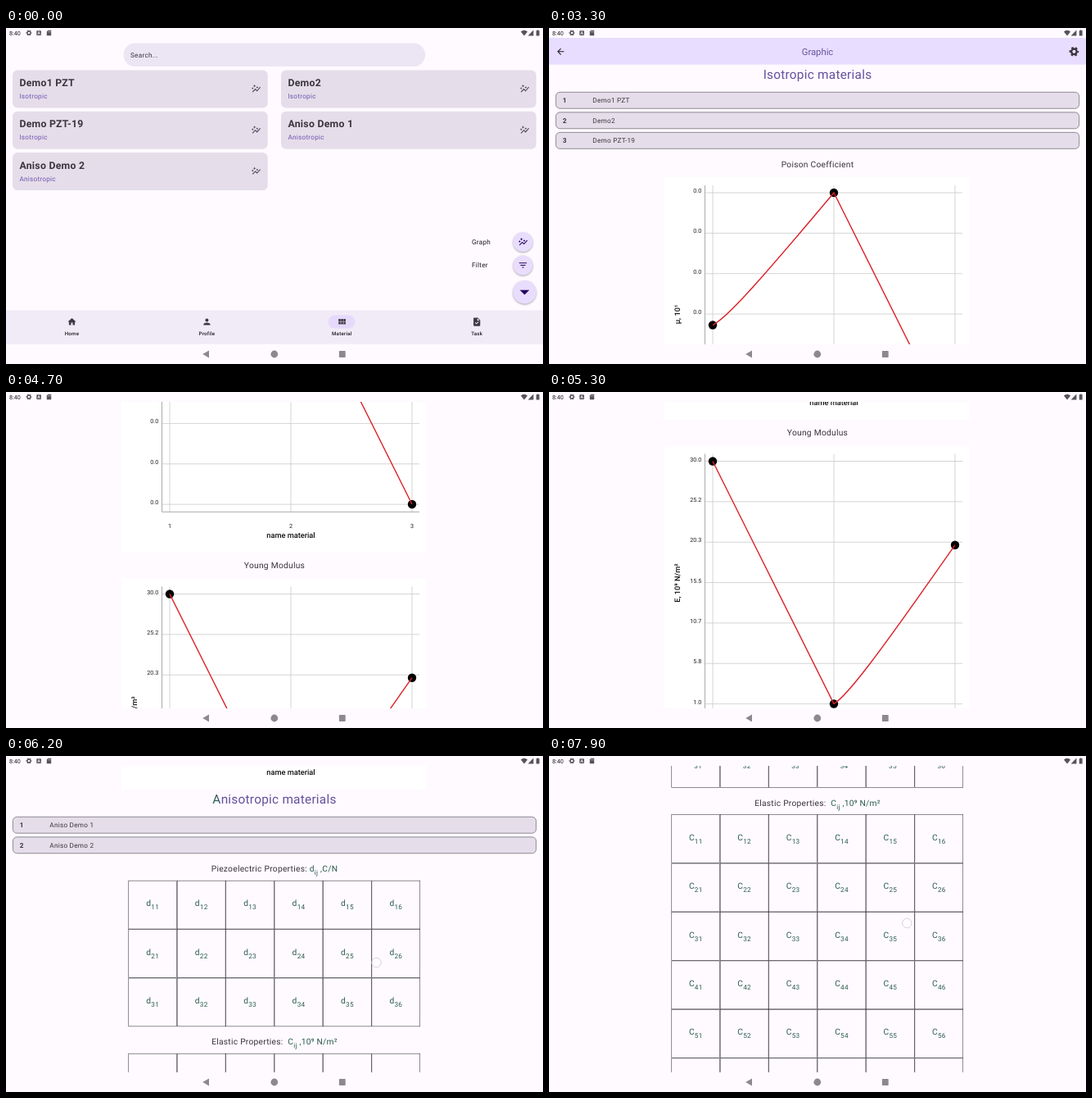
An HTML page for the animation above (8 s loop, 656 by 410 pixels).

```html
<!DOCTYPE html>
<html lang="en">
<head>
<meta charset="utf-8">
<title>Materials</title>
<style>
  html, body { margin: 0; width: 100%; height: 100%; overflow: hidden; background: #fefaff; }
  svg { display: block; width: 656px; height: 410px; }
  text { font: 8.2px Roboto, sans-serif; letter-spacing: .256px; fill: #1d1b20; text-rendering: geometricPrecision; white-space: pre; }
  .mid { text-anchor: middle; }
  .card { font-size: 12.3px; font-weight: 700; fill: #3a363f; }
  .kind { fill: #6f55ae; }
  .nav { font-size: 6.15px; font-weight: 500; }
  .bar { font-size: 11.275px; letter-spacing: 0; fill: #65539e; }
  .head { font-size: 15.375px; fill: #62519c; }
  .sub { font-size: 10.25px; fill: #37333b; }
  .row { fill: #3a363f; }
  .num { font-weight: 700; }
  .tick { font-size: 7.2px; letter-spacing: 0; }
  .axis { font-size: 9.225px; font-weight: 500; letter-spacing: 0; fill: #111; }
  .sym { font-size: 10.25px; fill: #2b5c4b; }
  .low { font-size: 8.2px; }
  .fab { fill: #e8ddfd; filter: drop-shadow(.6px 1.2px 1.2px #0005); }
</style>
</head>
<body>
<svg id="stage" viewBox="0 0 656 410">
  <defs>
    <clipPath id="view"><rect y="12" width="656" height="374"/></clipPath>
  </defs>
  <g id="list"></g>
  <g clip-path="url(#view)"><g id="detail"><g id="scroll"></g></g></g>
  <g id="system"></g>
  <circle id="touch" r="5.7" fill="#fff" fill-opacity=".6" stroke="#d3cad5" stroke-width=".9"/>
</svg>
<script>
const $ = id => document.getElementById(id);
const LOOP = 8000, STEP = 100;

const icons = {
  home: 'M10 20v-6h4v6h5v-8h3L12 3 2 12h3v8z',
  person: 'M12 12a4 4 0 1 0 0-8a4 4 0 0 0 0 8zm0 2c-2.7 0-8 1.3-8 4v2h16v-2c0-2.7-5.3-4-8-4z',
  grid: [5, 12].map(y => [4, 10, 16].map(x => `M${x} ${y}h5v6h-5z`).join('')).join(''),
  task: 'M14 2H6a2 2 0 0 0-2 2v16a2 2 0 0 0 2 2h12a2 2 0 0 0 2-2V8zm-3 16l-3.6-3.5 1.4-1.4 2.1 2.1 4.3-4.3 1.4 1.4zM13 9V3.5L18.5 9z',
  filter: 'M10 18h4v-2h-4zM3 6v2h18V6zm3 7h12v-2H6z',
  back: 'M20 11H7.8l5.6-5.6L12 4l-8 8 8 8 1.4-1.4L7.8 13H20z',
  graph: [[15, 9, 3], [4, 11, 3], [8.5, 5.5, 3.5]].map(([x, y, r]) =>
    `M${x} ${y - r}l${r * .3} ${r * .7} ${r * .7} ${r * .3} ${-r * .7} ${r * .3} ${-r * .3} ${r * .7} ${-r * .3} ${-r * .7} ${-r * .7} ${-r * .3} ${r * .7} ${-r * .3}z`
  ).join('') + 'M4.5 20.5l6-6 4 4L23 8.9l-1.4-1.4-7.1 8-4-4L3 19z'
};

const text = (s, x, y, cls = '') => `<text x="${x}" y="${y}" class="${cls}">${s}</text>`;
const rect = (x, y, w, h, fill, more = '') =>
  `<rect x="${x}" y="${y}" width="${w}" height="${h}" fill="${fill}" ${more}/>`;
const place = (cx, cy, size, body) =>
  `<g transform="translate(${cx - size / 2} ${cy - size / 2}) scale(${size / 24})">${body}</g>`;
const icon = (name, cx, cy, fill = '#3d3946', size = 12.3) =>
  place(cx, cy, size, `<path d="${icons[name]}" fill="${fill}" fill-rule="evenodd"/>`);
const gear = (cx, cy, size, color) => place(cx, cy, size,
  `<g fill="none" stroke="${color}"><circle cx="12" cy="12" r="5.6" stroke-width="4"/>
   <circle cx="12" cy="12" r="8.4" stroke-width="3.2" pathLength="12" stroke-dasharray="1 1" stroke-dashoffset=".5"/></g>`);
const lower = s => `<tspan class="low" dy="4">${s}</tspan>`;

function listScreen() {
  const cards = [['Demo1 PZT', 1], ['Demo2', 1], ['Demo PZT-19', 1], ['Aniso Demo 1', 0], ['Aniso Demo 2', 0]];
  const tabs = [['Home', 'home'], ['Profile', 'person'], ['Material', 'grid'], ['Task', 'task']];
  let out = rect(143.5, 18.5, 368.7, 28.6, '#ece6f4', 'rx="14.3"') + text('Search...', 152, 35.6, 'row');
  cards.forEach(([name, iso], i) => {
    const x = 8 + i % 2 * 328, y = 51.5 + (i >> 1) * 50.2;
    out += rect(x, y, 311.7, 46, '#e5deea', 'rx="6"')
      + text(name, x + 8.4, y + 19.7, 'card')
      + text(iso ? 'Isotropic' : 'Anisotropic', x + 8.4, y + 34.6, 'kind')
      + icon('graph', x + 297.4, y + 22.6, '#4a4458');
  });
  out += text('Graph', 569, 264, '') + text('Filter', 569, 292.2, '');
  for (const [x, y, r] of [[631.5, 261, 12], [631.5, 289.4, 12], [633.5, 322.3, 14.2]])
    out += `<circle class="fab" cx="${x}" cy="${y}" r="${r}"/>`;
  out += icon('graph', 631.5, 261, '#21005d') + icon('filter', 631.5, 289.4, '#21005d')
    + '<path d="M627.7 319.8h11.6l-5.8 5.8z" fill="#21005d"/>'
    + rect(0, 344.5, 656, 41.2, '#f1ebf8')
    + rect(393.6, 350.3, 32.8, 16.4, '#e6dafc', 'rx="8.2"');
  tabs.forEach(([name, ic], i) => {
    const x = 80.5 + i * 164.9;
    out += icon(ic, x, 358.5) + text(name, x, 375.3, 'nav mid');
  });
  return out;
}

function rows(names, top) {
  return names.map((name, i) => {
    const y = top + i * 24.55;
    return rect(8.4, y, 639.2, 19.9, '#e5deea', 'rx="5" stroke="#77717c" stroke-width=".8"')
      + text(i + 1, 16.8, y + 12.9, 'row num') + text(name, 53.3, y + 12.9, 'row');
  }).join('');
}

// Rising segments sag a little at the start, falling ones are straight.
function curve(pts) {
  let d = `M${pts[0]}`;
  for (let i = 1; i < pts.length; i++) {
    const [x0, y0] = pts[i - 1], [x, y] = pts[i], at = (u, v) => [x0 + (x - x0) * u, y0 + (y - y0) * v];
    d += y < y0 ? `C${at(.11, .05)} ${at(.34, .28)} ${x} ${y}` : `L${x} ${y}`;
  }
  return d;
}

function chart(title, unit, ticks, heights, dy) {
  const xs = [200, 348, 496];
  let out = text(title, 328, 169.8, 'sub mid') + rect(141, 182, 372, 374, '#fff');
  let grid = '';
  ticks.forEach((label, i) => {
    const y = 201 + i * 49.35;
    grid += `M190.5 ${y}H505`;
    out += `<text x="186.2" y="${y}" class="tick" text-anchor="end">${label}</text>`;
  });
  xs.forEach((x, i) => {
    grid += `M${x} 192V506`;
    out += text(i + 1, x, 525.5, 'tick mid');
  });
  out += `<path d="${grid}" stroke="#cbc9cc" stroke-width=".8"/>
    <path d="M190.5 192V506.3H505" fill="none" stroke="#a3a1a4" stroke-width=".9"/>`
    + text('name material', 348, 537.5, 'axis mid')
    + `<text class="axis mid" transform="translate(160 349.5) rotate(-90)">${unit}</text>`;
  const pts = xs.map((x, i) => [x, heights[i]]);
  for (const [x, y] of pts) out += `<circle cx="${x}" cy="${y}" r="5.2"/>`;
  out += `<path d="${curve(pts)}" fill="none" stroke="#dc2026" stroke-width="1.4"/>`;
  return `<g transform="translate(0 ${dy})">${out}</g>`;
}

function table(letter, count, top) {
  const w = 59.42;
  let out = '';
  for (let r = 0; r < count; r++)
    for (let c = 0; c < 6; c++) {
      const x = 149.5 + c * w, y = top + r * w;
      out += rect(x + .27, y + .27, w - .54, w - .54, 'none', 'stroke="#2e2c30" stroke-width=".54"')
        + text(letter + lower(`${r + 1}${c + 1}`), x + w / 2, y + 31.4, 'sym mid');
    }
  return out;
}

const caption = (label, letter, unit, y) =>
  text(`${label}<tspan class="sym">${letter}${lower('ij')}<tspan dy="-4"> ,${unit}</tspan></tspan>`, 328, y, 'sub mid');

function detailScreen() {
  return rect(0, 12, 656, 32.6, '#e8ddff')
    + icon('back', 14.2, 28.8, '#1d1b20') + gear(641.4, 28.8, 14, '#3a363f')
    + text('Graphic', 328, 32.6, 'bar mid')
    + text('Isotropic materials', 328, 62, 'head mid')
    + rows(['Demo1 PZT', 'Demo2', 'Demo PZT-19'], 78.3)
    + chart('Poison Coefficient', 'μ, 10¹', Array(7).fill('0.0'), [362.5, 201, 497], 0)
    + chart('Young Modulus', 'E, 10⁹ N/m²', ['30.0', '25.2', '20.3', '15.5', '10.7', '5.8', '1.0'], [201, 497, 303.2], 405.5)
    + text('<tspan fill="#2f5a5c">A</tspan>nisotropic materials', 328, 978, 'head mid')
    + rows(['Aniso Demo 1', 'Aniso Demo 2'], 994.8)
    + caption('Piezoelectric Properties: ', 'd', 'C/N', 1061.5) + table('d', 3, 1072.4)
    + caption('Elastic Properties:\u00a0 ', 'C', '10⁹ N/m²', 1272.7) + table('C', 6, 1283.4);
}

function systemBars() {
  const dark = '#55525a', grey = '#8b888e';
  return text('8:40', 4, 8.8, 'tick') + gear(28, 6, 8.4, dark)
    + rect(37.3, 3.2, 5.6, 5.8, dark, 'rx=".8"')
    + '<path d="M38.7 7.9L40.1 4.3 41.5 7.9M39.2 6.8h1.8" fill="none" stroke="#fff" stroke-width=".7"/>'
    + `<path d="M51.4 2.8h3.8v6.4h-5.4V4.5z" fill="${dark}"/>`
    + '<path d="M51.7 3.8v1.5M53 3.8v1.5M54.2 3.8v1.5" stroke="#fff" stroke-width=".5"/>'
    + `<path d="M628.9 4.4Q633 1.2 637.1 4.4L633 9.4zM644.4 2.6v6.8h-6.8zM648.6 2.4h2v.8h1v6.3h-3.9V3.2h.9z" fill="${dark}"/>`
    + `<path d="M248 393.6v8.8l-7.8-4.4z" fill="${grey}"/><circle cx="327.8" cy="398" r="4.4" fill="${grey}"/>`
    + rect(406.9, 394.1, 7.8, 7.8, grey, 'rx=".6"');
}

// [time, scroll offset]
const scrollPath = [
  [3700, 0], [3800, 18], [3900, 65], [4000, 128], [4100, 199.7], [4200, 258], [4300, 298], [4400, 325],
  [4600, 352], [4800, 368], [4900, 385], [5000, 410], [5100, 442], [5200, 480], [5300, 522], [5400, 572],
  [5500, 618], [5700, 694], [5900, 758], [6000, 790], [6100, 850], [6200, 920.5], [6300, 984],
  [6400, 1024], [6500, 1030], [6800, 1036], [7100, 1036], [7900, 1212]
];
// Touches: from, to, x, and the y that goes with offset 0
const touches = [
  [2400, 2500, 631, 261], [3800, 4200, 412, 336], [4800, 5200, 430, 738],
  [6000, 6300, 452.5, 1172.5], [7200, 8000, 437.3, 1416]
];

function offsetAt(t) {
  const i = scrollPath.findIndex(p => p[0] > t);
  if (i === 0) return 0;
  if (i < 0) return scrollPath.at(-1)[1];
  const [t0, a] = scrollPath[i - 1], [t1, b] = scrollPath[i];
  return a + (b - a) * (t - t0) / (t1 - t0);
}

function render(t) {
  const y = offsetAt(t);
  const k = Math.min(1, Math.max(0, (t - 2450) / 750));
  const fade = k * k * (3 - 2 * k);
  $('list').style.opacity = 1 - fade;
  $('list').style.visibility = fade === 1 ? 'hidden' : 'visible';
  $('detail').style.opacity = fade;
  $('scroll').setAttribute('transform', `translate(0 ${-y})`);
  const hit = touches.find(([from, to]) => t >= from && t < to);
  $('touch').style.visibility = hit ? 'visible' : 'hidden';
  if (hit) $('touch').setAttribute('transform', `translate(${hit[2]} ${hit[3] - y})`);
}

$('list').innerHTML = listScreen();
$('scroll').innerHTML = detailScreen();
$('system').innerHTML = systemBars();

const start = performance.now();
function tick() {
  const t = (performance.now() - start) % LOOP;
  render(Math.floor(t / STEP) * STEP);
  requestAnimationFrame(tick);
}
tick();
</script>
</body>
</html>
```
